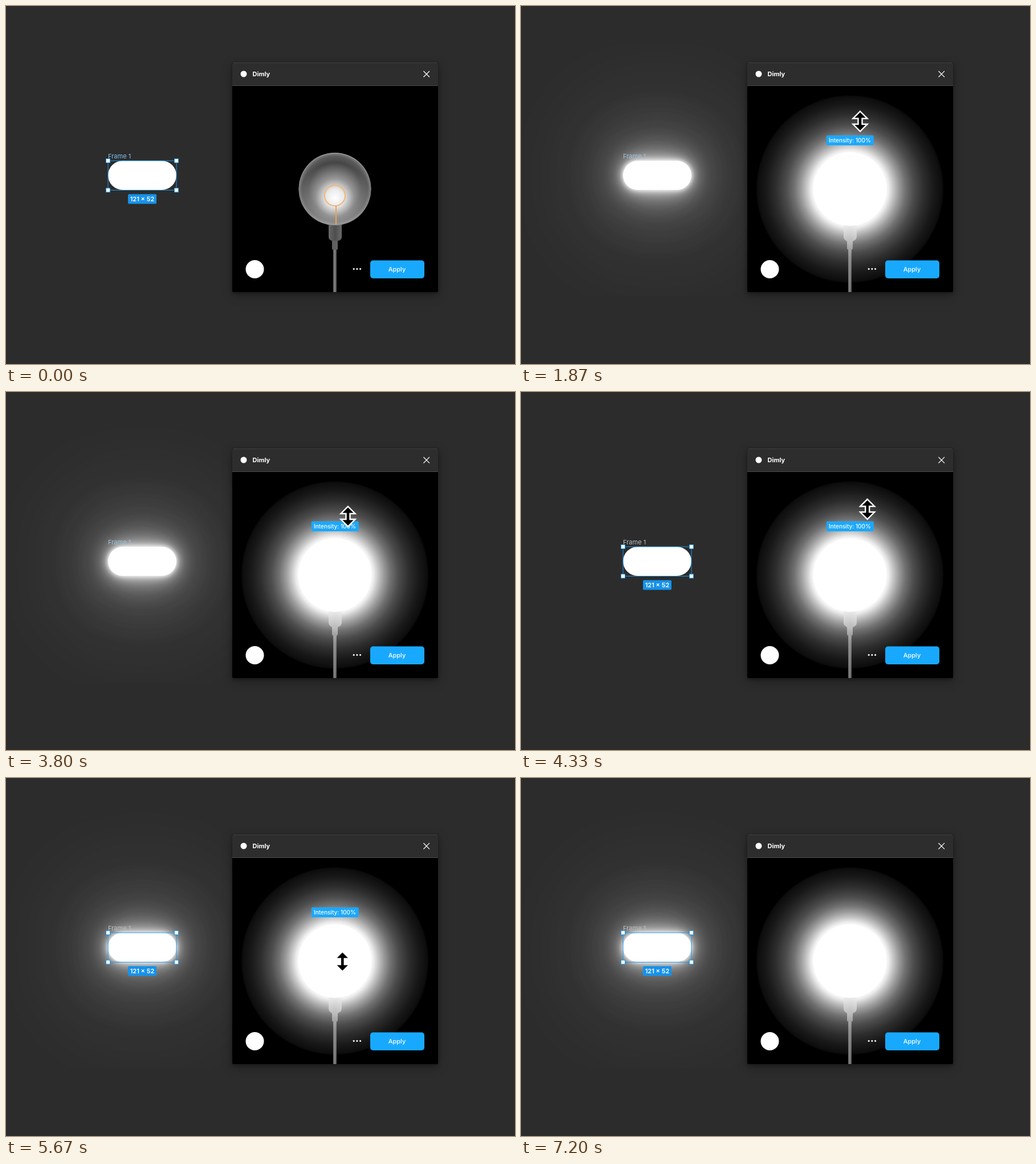
An HTML page that plays this animation: 893 px wide and 627 px high, repeating every 7760 ms.

```html
<!DOCTYPE html>
<html lang="en">
<head>
<meta charset="utf-8">
<title>Light intensity</title>
<style>
  html, body { margin: 0; width: 100%; height: 100%; overflow: hidden; background: #2c2c2c; }
  #pill { position: absolute; left: 179px; top: 271px; width: 120px; height: 51px; border-radius: 26px; background: #fff; }
  #panel { position: absolute; left: 397px; top: 99px; width: 361px; height: 402px; border-radius: 2px; background: #000;
    box-shadow: 0 5px 17px rgba(0, 0, 0, .35), 0 2px 5px rgba(0, 0, 0, .25); }
  svg { position: absolute; left: 0; top: 0; }
  text { font: 500 11px Inter, sans-serif; fill: #fff; }
  .mid { text-anchor: middle; }
</style>
</head>
<body>
<div id="pill"></div>
<div id="panel"></div>
<svg width="893" height="627" viewBox="0 0 893 627">
  <defs>
    <radialGradient id="glass">
      <stop offset="0" stop-color="#555"/>
      <stop offset=".72" stop-color="#444"/>
      <stop offset=".9" stop-color="#5a5a5a"/>
      <stop offset="1" stop-color="#858585"/>
    </radialGradient>
    <radialGradient id="core" gradientUnits="userSpaceOnUse" cx="577" cy="336" r="62">
      <stop offset="0" stop-color="#fff"/>
      <stop offset=".25" stop-color="#fff" stop-opacity=".88"/>
      <stop offset=".55" stop-color="#fff" stop-opacity=".4"/>
      <stop offset="1" stop-color="#fff" stop-opacity="0"/>
    </radialGradient>
    <linearGradient id="rim" x1="0" y1="0" x2="0" y2="1">
      <stop offset="0" stop-color="#bbb"/>
      <stop offset=".5" stop-color="#777"/>
      <stop offset="1" stop-color="#999"/>
    </linearGradient>
    <radialGradient id="halo"></radialGradient>
    <linearGradient id="metal">
      <stop offset="0" stop-color="#686868"/>
      <stop offset=".5" stop-color="#4e4e4e"/>
      <stop offset="1" stop-color="#6a6a6a"/>
    </linearGradient>
    <linearGradient id="cable">
      <stop offset="0" stop-color="#555"/>
      <stop offset=".45" stop-color="#858585"/>
      <stop offset="1" stop-color="#4a4a4a"/>
    </linearGradient>
    <linearGradient id="lit" gradientUnits="userSpaceOnUse" x1="0" y1="383" x2="0" y2="501">
      <stop offset="0" stop-color="#fff" stop-opacity=".9"/>
      <stop offset=".25" stop-color="#ddd" stop-opacity=".75"/>
      <stop offset=".5" stop-color="#aaa" stop-opacity=".5"/>
      <stop offset="1" stop-color="#888" stop-opacity=".1"/>
    </linearGradient>
    <clipPath id="body"><rect x="397" y="140" width="361" height="361"/></clipPath>
  </defs>

  <text id="name" x="179" y="267" style="font-weight:400">Frame 1</text>
  <g id="selection">
    <path d="M179 271H299V322.5H179Z" fill="none" stroke="#1c98f0"/>
    <g id="handles" fill="#fff" stroke="#1c98f0"></g>
    <rect x="214" y="329.5" width="50" height="17" rx="2" fill="#1692ea"/>
    <text class="mid" x="239" y="342" style="font-weight:600">121 × 52</text>
  </g>

  <g clip-path="url(#body)">
    <circle id="aura" cx="577" cy="320.5" r="165" fill="url(#halo)"/>
    <path d="M574 426h6v75h-6z" fill="url(#cable)"/>
    <path d="M572 410h10v15q0 2-2 2h-6q-2 0-2-2z" fill="#606060"/>
    <path d="M566 380h23v24q0 4-3 6l-2 1h-13l-2-1q-3-2-3-6z" fill="url(#metal)"/>
    <path id="stemLight" d="M566 380h23v24q0 4-3 6l-4 2v13l-2 2v74h-6v-74l-2-2v-13l-3-2q-3-2-3-6z" fill="url(#lit)"/>
    <circle cx="577" cy="320.5" r="63.5" fill="url(#glass)"/>
    <circle cx="577" cy="320.5" r="63" fill="url(#core)"/>
    <circle cx="577" cy="320.5" r="63" fill="none" stroke="url(#rim)" stroke-opacity=".7"/>
    <g fill="none" stroke="#f2b777" stroke-width="2">
      <circle cx="577" cy="332" r="18"/>
      <path d="M579 350V383" stroke="#e8a355"/>
    </g>
    <circle id="flare" cx="577" cy="320.5" r="64.5" fill="#fff"/>
  </g>

  <path d="M397 101q0-2 2-2h357q2 0 2 2v38H397z" fill="#2d2d2d"/>
  <path d="M397 139.5H758" stroke="#4a4a4a"/>
  <path d="M399 99.5H756" stroke="#404040"/>
  <circle cx="417" cy="119" r="5.5" fill="#fff"/>
  <text x="432.5" y="123" style="font-weight:700">Dimly</text>
  <path d="M732.5 114l10.5 10.5M743 114l-10.5 10.5" stroke="#fff" stroke-width="1.2"/>
  <circle cx="436.5" cy="461" r="16" fill="#fff"/>
  <path d="M610.2 460.5h0M615.9 460.5h0M621.6 460.5h0" stroke="#fff" stroke-width="3.2" stroke-linecap="round"/>
  <rect x="639" y="445.5" width="95" height="31.5" rx="5" fill="#18a9ff"/>
  <text class="mid" x="686" y="465">Apply</text>

  <g id="tip">
    <rect id="tipBox" y="226.5" height="17.5" rx="2.5" fill="#1ca8fb"/>
    <text id="tipText" class="mid" x="577" y="239" style="font-size:10px"></text>
  </g>

  <g id="cursor">
    <path id="resize" d="M0-17.5L12.5-5H3.5V5H12.5L0 17.5L-12.5 5H-3.5V-5H-12.5Z" fill="#000" stroke="#fff" stroke-width="2.4"/>
    <g id="hand">
      <path d="M-15 0L-6 9M-6-13L-3 4M1-15V4M8-13L6 4M15-8L10 5M-6 4L-3 13H8L12 4L5 0Z" fill="#000" stroke="#000" stroke-width="9" stroke-linecap="round" stroke-linejoin="round"/>
      <path d="M-15 0L-6 9M-6-13L-3 4M1-15V4M8-13L6 4M15-8L10 5M-6 4L-3 13H8L12 4L5 0Z" fill="#fff" stroke="#fff" stroke-width="5.6" stroke-linecap="round" stroke-linejoin="round"/>
      <path d="M-3 0V10M2.5 0V10M8 0V10" stroke="#000" stroke-width="1.8"/>
    </g>
    <path id="arrow" d="M-10-20V14L-2 7L4 20L10 17L4 5H14Z" fill="#000" stroke="#fff" stroke-width="2"/>
  </g>
</svg>
<script>
const LOOP = 7760;
const $ = id => document.getElementById(id);
const show = (id, on) => { $(id).style.display = on ? '' : 'none'; };
const clamp = (v, lo, hi) => Math.min(hi, Math.max(lo, v));
const DRAG = [1200, 4300], REAPPLIED = 5470;

// time, x, y of the pointer
const path = [
  [530, 602, 640], [1200, 588, 325], [1330, 588, 324], [1730, 595, 204], [1870, 595, 202],
  [2050, 595, 203], [2820, 590, 319], [3000, 590, 322], [3250, 590, 323], [3700, 599, 222],
  [3800, 600, 218], [4200, 607, 206], [4400, 608, 205], [4600, 608, 205], [5000, 610, 204],
  [5330, 608, 212], [6070, 568, 460], [6400, 565, 448], [6930, 564, 440], [7130, 583, 577], [7195, 583, 580]
];

// radius, strength of the light around the bulb
const falloff = [[62, 1], [68, .93], [76, .78], [86, .61], [98, .44], [112, .3], [130, .18], [148, .095], [162, .05], [165, 0]];
$('halo').innerHTML = falloff.map(([r, a]) =>
  `<stop offset="${r / 165}" stop-color="#fff" stop-opacity="${a}"/>`).join('');

// blur, alpha of the frame's stacked shadows
const layers = [[7, .9], [15, .8], [32, .7], [64, .7], [128, .75], [215, .85]];

$('handles').innerHTML = [[179, 271], [299, 271], [179, 322.5], [299, 322.5]].map(([x, y]) =>
  `<rect x="${x - 3.5}" y="${y - 3.5}" width="7" height="7"/>`).join('');

function pointer(t) {
  const i = path.findIndex(p => p[0] > t);
  if (i < 1) return null;
  const [t0, x0, y0] = path[i - 1], [t1, x1, y1] = path[i];
  const u = (t - t0) / (t1 - t0), e = u * u * (3 - 2 * u);
  return [x0 + (x1 - x0) * e, y0 + (y1 - y0) * e];
}

function drawCursor(pos) {
  show('cursor', pos);
  if (!pos) return show('tip', false);
  const [x, y] = pos;
  const kind = y > 501 ? 'arrow' : y > 384 ? 'hand' : 'resize';
  for (const id of ['arrow', 'hand', 'resize']) show(id, id === kind);
  show('tip', kind === 'resize');
  $('cursor').setAttribute('transform', `translate(${x.toFixed(1)} ${y.toFixed(1)})`);
}

function drawLight(k, onFrame) {
  const r = 75 + 90 * k;
  $('aura').setAttribute('r', r);
  $('aura').style.opacity = Math.min(1, k * 1.3);
  $('flare').style.opacity = Math.pow(k, .75);
  $('stemLight').style.opacity = k;
  $('pill').style.boxShadow = onFrame && k > .01 ? layers.map(([blur, a]) =>
    `0 0 ${(blur * (.3 + .7 * k)).toFixed(1)}px rgba(255,255,255,${(a * Math.min(1, k * 1.2)).toFixed(3)})`).join() : 'none';
}

function draw(t) {
  const pos = pointer(t);
  const dragging = t >= DRAG[0] && t < DRAG[1];
  let level = t < DRAG[0] ? 11 : 100;
  if (dragging) level = clamp(11 + (325 - pos[1]) * .95, 11, 100);
  drawLight((clamp(level, 14, 100) - 14) / 86, dragging || t >= REAPPLIED);
  show('selection', !dragging);
  $('name').style.fill = t < 1870 ? '#7fc0ee' : t < DRAG[1] ? '#9cc4da' : '#b8c0c4';

  const width = level >= 99.5 ? 83 : 77;
  $('tipBox').setAttribute('x', 577.3 - width / 2);
  $('tipBox').setAttribute('width', width);
  $('tipText').textContent = `Intensity: ${Math.round(level)}%`;
  drawCursor(pos);
}

const start = performance.now();
function tick() {
  draw((performance.now() - start) % LOOP);
  requestAnimationFrame(tick);
}
tick();
</script>
</body>
</html>
```
